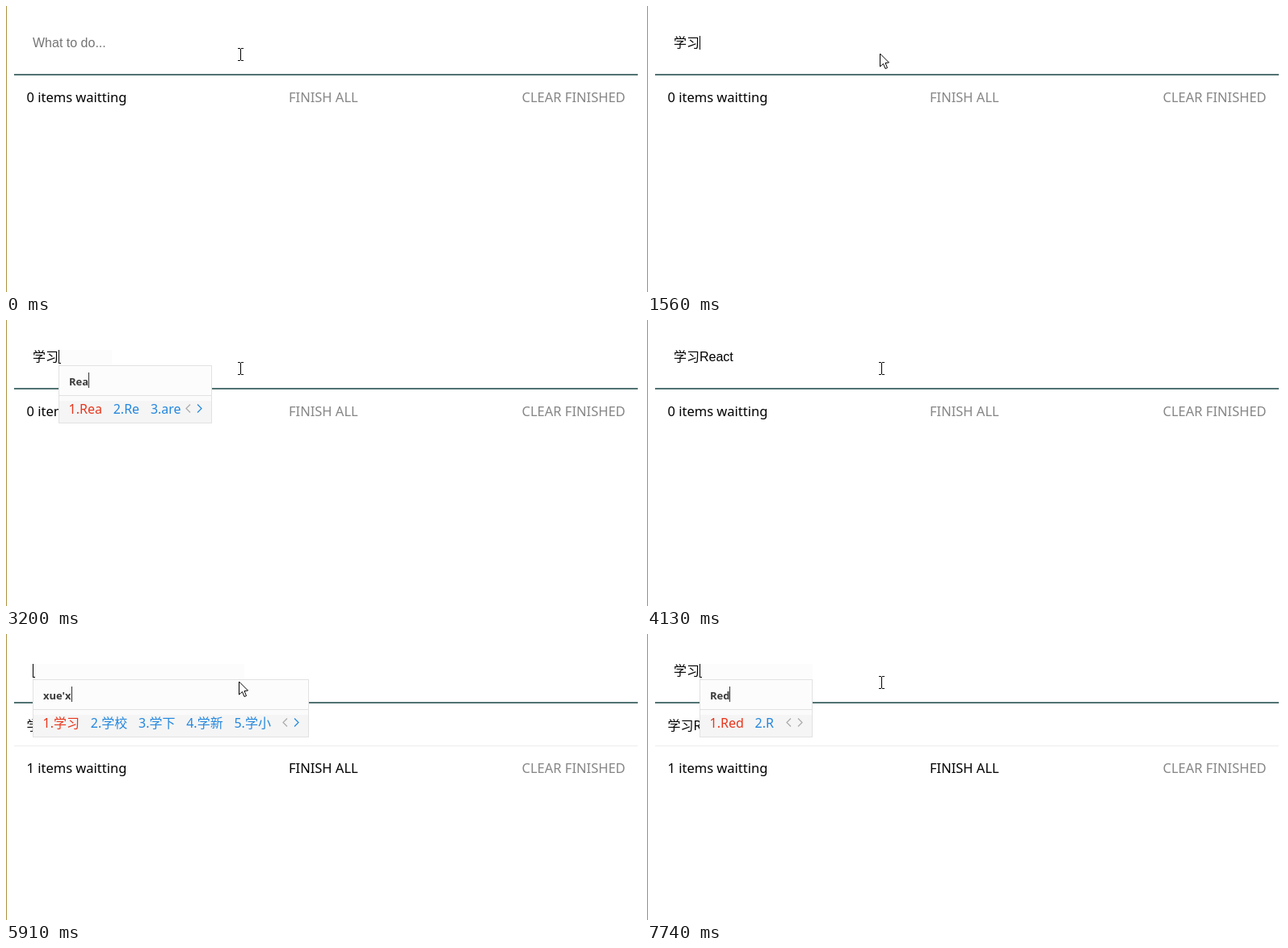
Recreate the animation shown at these times as an HTML page with a canvas. Size 786 by 354 pixels, loop 8 s.

```html
<!DOCTYPE html>
<html lang="zh-CN">
<head>
<meta charset="utf-8">
<title>Todo input</title>
<style>
html, body { margin: 0; width: 100%; height: 100%; overflow: hidden; background: #fff; }
canvas { display: block; }
</style>
</head>
<body>
<canvas id="stage" width="786" height="354"></canvas>
<script>
const ctx = document.getElementById('stage').getContext('2d');
const LOOP = 8000;
const CJK = "'Noto Sans CJK SC', 'Noto Sans CJK', sans-serif";
const FIELD = "16px 'Liberation Sans', " + CJK;
const LABEL = "16.5px 'Noto Sans', " + CJK;
const ITEM = "16px 'Noto Sans', " + CJK;
const SMALL = "12px 'Noto Sans', " + CJK;
const PRE = "bold condensed 13px 'Open Sans', 'Roboto', sans-serif";
const GREY = '#868686', RED = '#e8361c', BLUE = '#2487de';

// Candidate windows: typed letters, right edge, words, cloud suggestion
const ime = {
  x: { pre: 'x', right: 295, words: '想 下 需 向 小' },
  xu: { pre: 'xu', right: 295, words: '需 许 续 虚 徐' },
  xue: { pre: 'xue', right: 295, words: '学 血 雪 薛 靴', cloud: '6.(ˇ=ˇ)ψ', cloudX: 115 },
  xuex: { pre: "xue'x", right: 375, words: '学习 学校 学下 学新 学小' },
  xuexi: { pre: "xue'xi", right: 375, words: '学习 血洗 学戏 学系 雪席' },
  cloud: { pre: "xue'xi", right: 375, words: '学习 血洗 学戏 学系 雪席', cloud: '6.(^_^)ψ', cloudX: 129 },
  R: { pre: 'R', right: 131, words: 'R', plain: true },
  Re: { pre: 'Re', right: 202, words: 'Re re' },
  Rea: { pre: 'Rea', right: 255, words: 'Rea Re are' },
  Reac: { pre: 'Reac', right: 303, words: 'Reach React Re' },
  React: { pre: 'React', right: 303, words: 'React Reach Re' },
  Red: { pre: 'Red', right: 205, words: 'Red R' }
};

// Each entry changes only what it names
const steps = [
  [0, { value: '', caret: false, popup: '', items: 0, arrow: false, pale: null }],
  [590, { popup: 'x', caret: true, pale: [33, 37, 295] }],
  [710, { popup: 'xu', arrow: true, pale: [33, 37, 319] }],
  [990, { popup: 'xue' }],
  [1140, { popup: 'xuex' }],
  [1260, { popup: 'xuexi' }],
  [1410, { popup: 'cloud' }],
  [1560, { popup: '', value: '学习', pale: null }],
  [1680, { arrow: false }],
  [2240, { caret: false }],
  [2670, { popup: 'R' }],
  [2790, { caret: true, pale: [65, 37, 131] }],
  [3060, { popup: 'Re' }],
  [3200, { popup: 'Rea' }],
  [3330, { popup: 'Reac' }],
  [3480, { popup: 'React', arrow: true, pale: [65, 37, 319] }],
  [3610, { popup: '', value: '学习React', arrow: false, pale: null }],
  [4130, { caret: false }],
  [4530, { value: '', caret: true, items: 1 }],
  [4970, { caret: false }],
  [5500, { caret: true }],
  [5640, { popup: 'xu', pale: [33, 37, 295] }],
  [5770, { popup: 'xue' }],
  [5910, { popup: 'xuex', arrow: true }],
  [6030, { popup: 'xuexi' }],
  [6150, { popup: 'cloud' }],
  [6300, { popup: '', value: '学习', arrow: false, pale: null }],
  [6870, { popup: 'R' }],
  [7150, { popup: 'Re' }],
  [7580, { caret: false }],
  [7740, { popup: 'Red', caret: true, pale: [65, 37, 205] }]
];

function stateAt(t) {
  const s = {};
  for (const [at, change] of steps) if (t >= at) Object.assign(s, change);
  return s;
}

function rect(x, y, w, h, color) {
  ctx.fillStyle = color;
  ctx.fillRect(x, y, w, h);
}

function text(str, x, y, color, font) {
  ctx.font = font;
  ctx.fillStyle = color;
  ctx.fillText(str, x, y);
  return ctx.measureText(str).width;
}

function path(points, color, width) {
  ctx.beginPath();
  points.forEach(([x, y]) => ctx.lineTo(x, y));
  ctx.strokeStyle = color;
  ctx.lineWidth = width;
  ctx.stroke();
}

function chevron(x, dir, color) {
  path([[x - 2.5 * dir, 104.5], [x + 2.5 * dir, 109.5], [x - 2.5 * dir, 114.5]], color, 1.2);
}

function drawPage(s) {
  rect(0, 0, 786, 354, '#fff');
  rect(0, 0, 1, 354, '#ae9140');
  rect(10, 84, 772, 2, '#527272');
  const y = 119 + 53 * s.items;
  if (s.items) {
    text('学习React', 25.5, 119, '#000', ITEM);
    rect(10, 138, 772, 1, '#ededed');
  }
  text(s.items + ' items waitting', 25.5, y, '#000', LABEL);
  text('FINISH ALL', 350, y, s.items ? '#000' : GREY, LABEL);
  text('CLEAR FINISHED', 638.5, y, GREY, LABEL);
}

function drawField(s) {
  if (s.pale) {
    const [x, y, right] = s.pale;
    rect(x, y, right - x, 47, '#fcfcfc');
    rect(x, 86, right - x, 42, '#fcfcfc');
  }
  if (s.value) text(s.value, 33, 51, '#000', FIELD);
  else if (!s.popup) text('What to do...', 33, 51, '#757575', FIELD);
  if (s.caret) {
    const x = { '': 33, '学习': 65 }[s.value] || 107;
    rect(x, s.value || s.popup ? 37 : 38, 1, 17, '#000');
    if (s.popup) rect(x, 53, 3, 1, '#000');
  }
}

function drawPopup(p, x) {
  const w = p.right - x;
  rect(x, 56, w, 72, '#e2e2e2');
  rect(x + 1, 57, w - 2, 36, '#fcfcfc');
  rect(x + 1, 94, w - 2, 33, '#fbfbfb');
  rect(x + 1, 100, w - 2, 27, '#f5f5f5');
  const end = x + 13 + text(p.pre, x + 13, 81, '#3c3c3c', PRE);
  rect(Math.round(end), 65, 1, 19, '#333');
  if (p.cloud) text(p.cloud, p.cloudX, 81, '#dedede', SMALL);
  let at = x + 12.5;
  p.words.split(' ').forEach((word, i) => {
    at += text(i + 1 + '.' + word, at, 116, i ? BLUE : RED, ITEM) + 13.8;
  });
  if (p.plain) return;
  chevron(p.right - 29.5, -1, '#aaa');
  chevron(p.right - 15.5, 1, p.right > 205 ? BLUE : '#aaa');
}

function drawPointer(arrow) {
  if (!arrow) {
    rect(290, 53, 1, 14, '#000');
    for (const y of [52, 67]) {
      rect(287, y, 3, 1, '#000');
      rect(291, y, 3, 1, '#000');
    }
    return;
  }
  ctx.beginPath();
  [[0, 0], [0, 16], [4, 12.5], [6.5, 18.5], [9, 17.5], [6.5, 11.5], [11, 11]]
    .forEach(([x, y]) => ctx.lineTo(288.5 + x, 59 + y));
  ctx.closePath();
  ctx.fillStyle = '#fff';
  ctx.fill();
  ctx.strokeStyle = '#000';
  ctx.lineWidth = 1;
  ctx.stroke();
}

function draw(t) {
  const s = stateAt(t);
  drawPage(s);
  drawField(s);
  if (s.popup) drawPopup(ime[s.popup], s.value ? 65 : 33);
  drawPointer(s.arrow);
}

const start = performance.now();
function tick(now) {
  draw(Math.max(0, now - start) % LOOP);
  requestAnimationFrame(tick);
}
draw(0);
requestAnimationFrame(tick);
</script>
</body>
</html>
```
